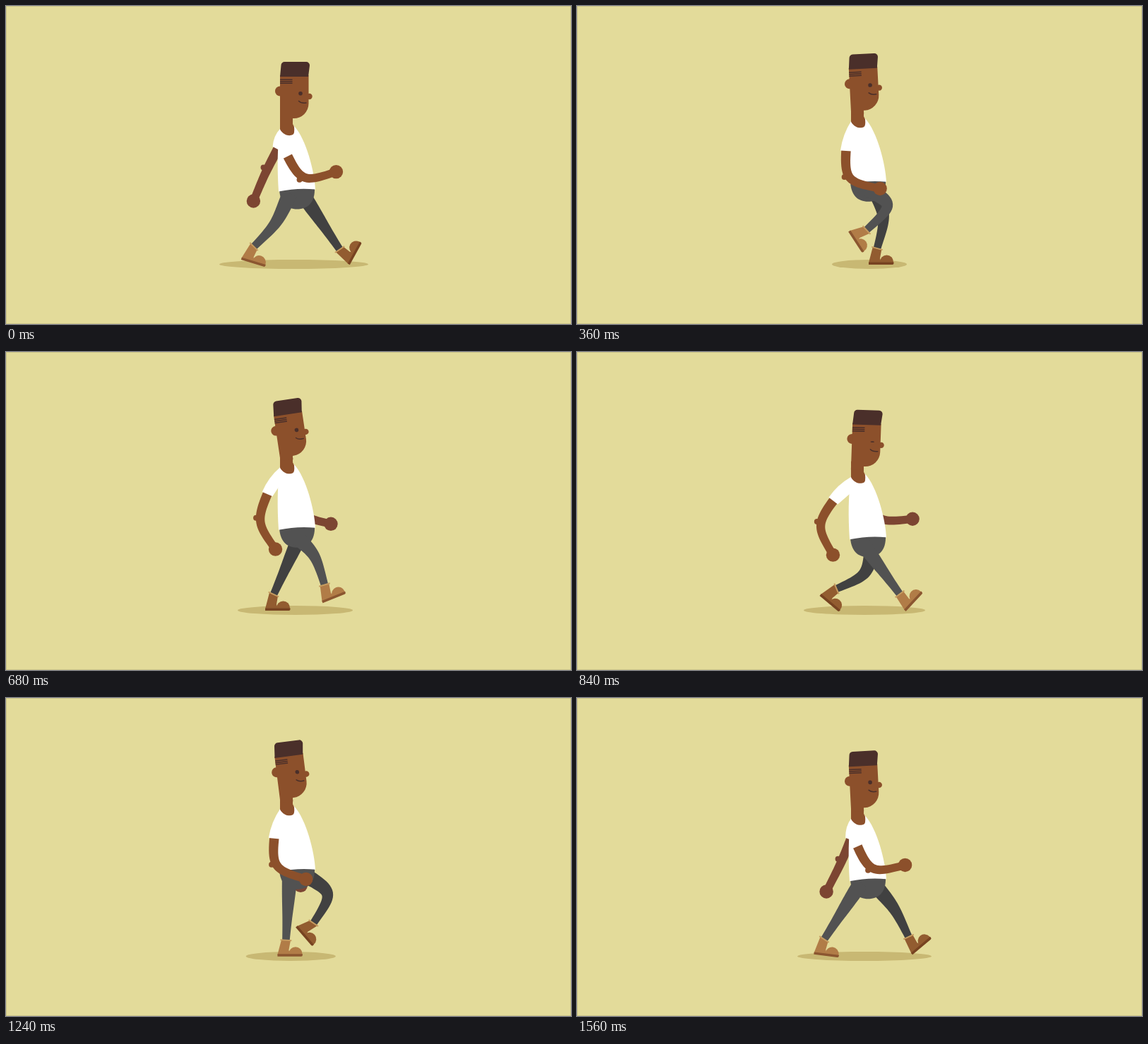
Animation of 800 by 450 pixels, one loop 1600 ms. Source, as an HTML page with a canvas:

```html
<!DOCTYPE html>
<html lang="en">
<head>
<meta charset="utf-8">
<title>Walk cycle</title>
<style>
  html, body { margin: 0; width: 100%; height: 100%; overflow: hidden; background: #e3db9a; }
  canvas { display: block; }
</style>
</head>
<body>
<canvas id="stage" width="800" height="450"></canvas>
<script>
const ctx = document.getElementById('stage').getContext('2d');
const LOOP = 1600, STEP = LOOP / 2, FRAME = 40, RAD = Math.PI / 180;
const LEG = 46, HIP = [402, 265], FAR_SHIFT = 17;

const NEAR = { skin: '#8c502b', cloth: '#525252', boot: '#b17c47', sole: '#8b5630' };
const FAR = { skin: '#7c4532', cloth: '#414141', boot: '#925c30', sole: '#774321' };
const HAIR = '#4a2f2a';

// time, ankle x, ankle y, foot angle
const legKeys = [
  [0, 351, 340.5, 17], [40, 350.5, 335, 40], [280, 366, 315, 97], [360, 410, 317, 57],
  [600, 425.5, 322.5, 36], [680, 451, 329.5, -22], [760, 452.5, 338, -40], [800, 455.5, 344.5, -61],
  [840, 457, 342.5, -47], [950, 442, 343, 0], [1080, 422, 343, 0], [1160, 408, 343, 0],
  [1400, 374, 342.5, 0], [1480, 362, 343, 0], [1560, 350, 341.5, 7]
];
// time, upper arm angle, forearm angle (0 hangs down, positive swings forward)
const nearArmKeys = [
  [0, 30.3, 97], [360, 0, 67], [680, -20.3, 26], [840, -33.7, 20],
  [1080, -17.4, 52], [1400, 14, 71], [1560, 27.3, 93]
];
const farArmKeys = [
  [0, -27.9, -23.5], [360, -6, 35], [680, 16, 68], [840, 28, 87],
  [1080, 6, 60], [1400, -9.5, -9], [1560, -22.5, -26.6]
];
const tiltKeys = [[0, 0], [40, 2], [280, 1], [360, -3], [600, -14], [680, -8.5], [760, -3]];
// time, left end, right end
const shadowKeys = [
  [0, 302, 513], [360, 361, 467], [680, 328, 491], [840, 321, 493],
  [1080, 340, 467], [1400, 333, 475], [1560, 312, 502]
];

const shape = {
  pelvis: new Path2D('M387 257C387 279 398 287.5 412 287.5C427 287.5 438 278 437 257Z'),
  shirt: new Path2D('M388 173C384 200 384 230 386 262.5Q412 257 438 259.5C437 235 425 188 408 170Z'),
  neck: new Path2D('M388 152V175C394 184 402 184 406 182Q409 181 408 171L406 167V152Z'),
  face: new Path2D('M388 98H428.5V138A21 21 0 0 1 407.5 159H406V164H388Z'),
  hair: new Path2D('M394.5 79H425A5 5 0 0 1 430 84L428 100H388L389.5 84A5 5 0 0 1 394.5 79Z'),
  stripes: new Path2D('M388 104.3H405.5M388 106.8H405.5M388 109.3H405.5'),
  mouth: new Path2D('M414.5 134.5Q418 138 425 137'),
  toe: new Path2D('M4 20.5V19A9.5 9.5 0 0 1 23 19V20.5Z'),
  sole: new Path2D('M-12 19.5H23.5V21Q23.5 23 21.5 23H-12Z')
};

// Smooth periodic interpolation of key rows
function sample(keys, time, period = LOOP) {
  const n = keys.length, t = time % period;
  const i = keys.filter(k => k[0] <= t).length - 1;
  const [a, b, c, d] = [-1, 0, 1, 2].map(o => {
    const j = i + o, row = keys[(j + n) % n];
    return [row[0] + period * Math.floor(j / n), ...row.slice(1)];
  });
  const span = c[0] - b[0], s = (t - b[0]) / span, s2 = s * s, s3 = s2 * s;
  return b.slice(1).map((p, k) => {
    const q = c[k + 1];
    const m0 = (q - a[k + 1]) / (c[0] - a[0]) * span;
    const m1 = (d[k + 1] - p) / (d[0] - b[0]) * span;
    return p + (q - p) * (3 * s2 - 2 * s3) + m0 * (s3 - 2 * s2 + s) + m1 * (s3 - s2);
  });
}

function fill(path, color) {
  ctx.fillStyle = color;
  ctx.fill(path);
}

function ellipse(x, y, rx, ry, color) {
  ctx.fillStyle = color;
  ctx.beginPath();
  ctx.ellipse(x, y, rx, ry, 0, 0, 2 * Math.PI);
  ctx.fill();
}

function polygon(points, color) {
  ctx.fillStyle = color;
  ctx.beginPath();
  points.forEach(p => ctx.lineTo(...p));
  ctx.closePath();
  ctx.fill();
}

// Bent tube through a middle joint: returns point and direction at s
function tube(start, joint, end) {
  const ctrl = joint.map((j, k) => j + (j - (start[k] + end[k]) / 2) / 3);
  return s => {
    const u = 1 - s;
    const [x, y] = ctrl.map((c, k) => u ** 3 * start[k] + 3 * u * s * c + s ** 3 * end[k]);
    const [dx, dy] = ctrl.map((c, k) => u * u * (c - start[k]) + s * s * (end[k] - c));
    return { x, y, angle: Math.atan2(dy, dx) };
  };
}

const beside = (p, w) => [p.x - Math.sin(p.angle) * w, p.y + Math.cos(p.angle) * w];

function drawTube(curve, from, w0, w1, color) {
  const left = [], right = [];
  for (let i = 0; i <= 24; i++) {
    const s = from + (1 - from) * i / 24, p = curve(s), w = (w0 + (w1 - w0) * s) / 2;
    left.push(beside(p, w));
    right.unshift(beside(p, -w));
  }
  polygon([...left, ...right], color);
}

function drawLeg(phase, shift, bob, look) {
  const [x, ay, footAngle] = sample(legKeys, phase);
  const ax = x + shift, hx = HIP[0] + shift, hy = HIP[1] + bob;
  const dx = ax - hx, dy = ay - hy, dist = Math.hypot(dx, dy);
  const bend = Math.sqrt(Math.max(0, LEG * LEG - dist * dist / 4)) / dist;
  const knee = [(hx + ax) / 2 + dy * bend, (hy + ay) / 2 - dx * bend];
  const curve = tube([hx, hy], knee, [ax, ay]);
  drawTube(curve, 0, 22, 10.5, look.cloth);

  const foot = footAngle * RAD, cuff = curve(1).angle - Math.PI / 2 - foot;
  const cx = Math.cos(cuff), cy = Math.sin(cuff);
  ctx.save();
  ctx.translate(ax, ay);
  ctx.rotate(foot);
  polygon([[-6.5 * cx, -6.5 * cy], [6.5 * cx, 6.5 * cy], [4, 14], [6, 20.5], [-12, 20.5]], look.boot);
  fill(shape.toe, look.boot);
  fill(shape.sole, look.sole);
  ctx.rotate(cuff);
  ctx.fillStyle = '#c69c60';
  ctx.fillRect(-8, -1, 16, 2);
  ctx.restore();
}

function drawArm(keys, time, shoulder, upper, look) {
  const [a, b] = sample(keys, time).map(v => v * RAD);
  const elbow = [shoulder[0] + upper * Math.sin(a), shoulder[1] + upper * Math.cos(a)];
  const hand = [elbow[0] + 49 * Math.sin(b), elbow[1] + 49 * Math.cos(b)];
  const curve = tube(shoulder, elbow, hand);
  const back = Math.atan2(hand[1] - shoulder[1], hand[0] - shoulder[0]) + Math.PI / 2;
  drawTube(curve, 0.17, 14, 11, look.skin);
  ellipse(elbow[0] + 6 * Math.cos(back), elbow[1] + 6 * Math.sin(back), 4, 4, look.skin);
  ellipse(...hand, 9.7, 9.7, look.skin);

  const hem = curve(0.18), outer = beside(hem, 8), inner = beside(hem, -8);
  ctx.fillStyle = '#fff';
  ctx.beginPath();
  ctx.moveTo(388, 174);
  ctx.quadraticCurveTo((388 + outer[0]) / 2 - 4, (174 + outer[1]) / 2 - 3, ...outer);
  ctx.lineTo(...inner);
  ctx.lineTo(392, 193);
  ctx.fill();
}

function drawHead(time) {
  const blink = Math.max(0, 1 - Math.abs(time - 840) / 100);
  ctx.save();
  ctx.translate(397, 160);
  ctx.rotate(sample(tiltKeys, time, STEP)[0] * RAD);
  ctx.translate(-397, -160);
  ellipse(388, 120.5, 7, 7, NEAR.skin);
  ellipse(429.5, 128, 4.2, 4.2, NEAR.skin);
  fill(shape.face, NEAR.skin);
  fill(shape.hair, HAIR);
  ctx.strokeStyle = HAIR;
  ctx.lineWidth = 1.5;
  ctx.stroke(shape.stripes);
  ctx.lineCap = 'round';
  ctx.stroke(shape.mouth);
  ctx.lineCap = 'butt';
  ellipse(417, 123.7, 2.8, 2.8 - 1.9 * blink, HAIR);
  ctx.restore();
}

function draw(time) {
  const bob = -7 + 12 * Math.cos(2 * Math.PI * (time - 120) / STEP);
  const withBob = paint => {
    ctx.save();
    ctx.translate(0, bob);
    paint();
    ctx.restore();
  };
  ctx.fillStyle = '#e3db9a';
  ctx.fillRect(0, 0, 800, 450);
  ctx.strokeStyle = '#cac38a';
  ctx.lineWidth = 1;
  ctx.strokeRect(0.5, 0.5, 799, 449);

  const [left, right] = sample(shadowKeys, time);
  ellipse((left + right) / 2, 365.5, (right - left) / 2, 6.5, '#c8b873');

  withBob(() => drawArm(farArmKeys, time, [398, 178], 60, FAR));
  drawLeg(time + STEP, FAR_SHIFT, bob, FAR);
  withBob(() => fill(shape.pelvis, NEAR.cloth));
  drawLeg(time, 0, bob, NEAR);
  withBob(() => {
    fill(shape.shirt, '#fff');
    fill(shape.neck, NEAR.skin);
    drawHead(time);
    drawArm(nearArmKeys, time, [384, 181], 69, NEAR);
  });
}

function tick() {
  draw(Math.floor(performance.now() % LOOP / FRAME) * FRAME);
  requestAnimationFrame(tick);
}
tick();
</script>
</body>
</html>
```
